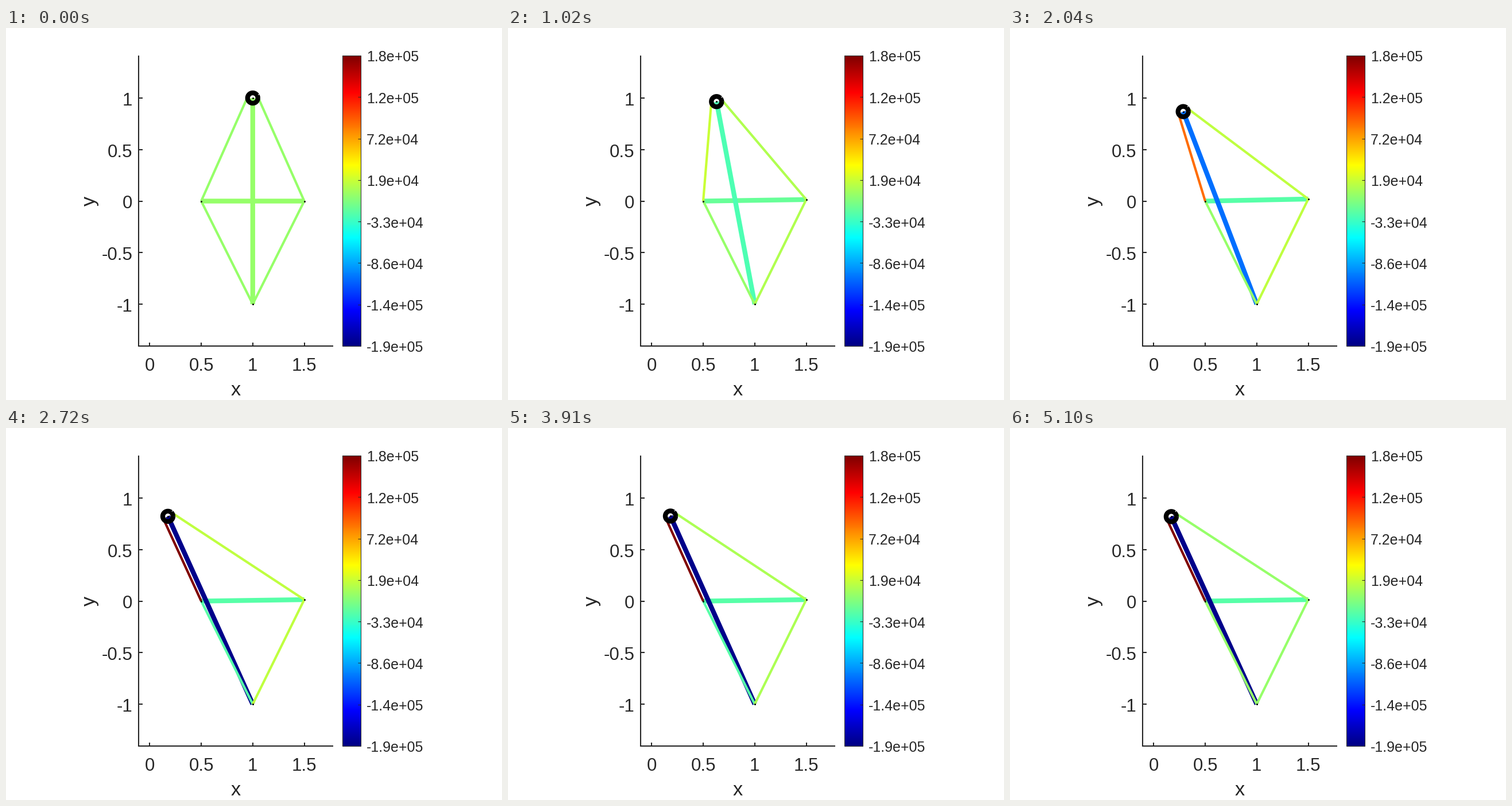
These frames come from a looping animation (864 px wide and 648 px high, 5.27 s). A matplotlib script:

```python
import numpy as np
import matplotlib.pyplot as plt
from matplotlib.animation import FuncAnimation
from matplotlib.colors import ListedColormap
from matplotlib.patches import Rectangle

W, H, DPI = 864, 648, 100
PX = 72 / DPI              # points per stage pixel
PT = 150 / 72              # plot line weights and fonts are set at 150 dpi
FRAMES, STEP = 31, 170
X0, Y0, UNIT = 250.3, 301.5, 179.5
INK = "#262626"
RING_R = 0.05 * UNIT
ZERO = 0.522               # unloaded level on the colour bar

plt.rcParams["font.family"] = "Liberation Sans"
fig = plt.figure(figsize=(W / DPI, H / DPI), dpi=DPI, facecolor="white")
ax = fig.add_axes([0, 0, 1, 1])
ax.axis("off")


def jet(v):
    bands = [1.5 - np.abs(4 * np.asarray(v) - c) for c in (3, 2, 1)]
    return np.clip(np.stack(bands, axis=-1), 0, 1)


def to_px(x, y):
    return np.array([X0 + UNIT * x, Y0 - UNIT * y])


def line(xs, ys, weight, color=INK, z=2, **kw):
    return ax.plot(xs, ys, lw=weight * PT * PX, color=color, zorder=z,
                   solid_capstyle="butt", **kw)[0]


def label(x, y, s, size, ha="center", **kw):
    ax.text(x, y, s, fontsize=size * PT * PX, color=INK, ha=ha,
            va="baseline", **kw)


def ease(t, start, end):
    u = np.clip((t - start) / (end - start), 0, 1)
    return u * u * (3 - 2 * u)


def polar(center, r, a):
    return center[0] + r * np.cos(a), center[1] + r * np.sin(a)


def tangent_angle(center, anchor, side):
    """Angle at which a string from anchor touches the ring."""
    d = anchor - center
    return np.arctan2(d[1], d[0]) + side * np.arccos(RING_R / np.hypot(*d))


# Axes
line([231, 231], [48, 555], 1)
line([230, 570], [554, 554], 1)
for v in np.arange(0, 2, 0.5):
    x = to_px(v, 0)[0]
    line([x, x], [554, 548], 1)
    label(x, 597, f"{v:g}", 15)
for v in np.arange(-1, 1.5, 0.5):
    y = to_px(0, v)[1]
    line([231, 238], [y, y], 1)
    label(220, y + 13, f"{v:g}", 15, ha="right")
label(400, 640, "x", 16.5)
label(154.5, 301, "y", 16.5, rotation=90, rotation_mode="anchor")

# Colour bar
ax.imshow(np.arange(256)[::-1, None], aspect="auto", zorder=1,
          cmap=ListedColormap(jet(np.arange(1, 257) / 256)),
          extent=(586, 618, 554, 48), interpolation="nearest")
ax.add_patch(Rectangle((586, 48), 32, 506, fill=False, ec=INK,
                       lw=PX, zorder=3))
for k, y in enumerate(np.linspace(554, 48, 8)):
    line([613, 618], [y, y], 0.5, z=3)
    label(628, y + 10.5, f"{-1.906e5 + 5.25e4 * k:.1e}", 12, ha="left")

ax.set_xlim(0, W)
ax.set_ylim(H, 0)

# Members, from back to front
MEMBERS = {"beam": 4, "mast": 4, "upper_left": 2, "upper_right": 2,
           "lower_left": 2, "lower_right": 2}
bars = {name: line([], [], weight, z=5 + i, snap=False)
        for i, (name, weight) in enumerate(MEMBERS.items())}
ring = line([], [], 4, "black", 20, snap=False)
notch = line([], [], 0.6, "white", 21, snap=False)
dots = ax.plot([], [], "o", ms=3 * PX, color="black", mew=0, zorder=22)[0]

LEFT, BOTTOM = to_px(0.5, 0), to_px(1, -1)
TURN = np.linspace(0, 2 * np.pi, 90)
SWING = 17.2               # frames until the mast meets its stop


def mast_x(t):
    """Fall towards the stop, then a slight rebound."""
    fall = np.sin(np.pi / 2 * min(t / SWING, 1) ** 1.16)
    rebound = 1 - np.cos(2 * np.pi * max(t - SWING, 0) / 12)
    return 1 - 0.83 * fall + 0.006 * rebound


def loads(t):
    u = min(t / 16, 1)
    pull = 0.041 * np.sin(np.pi * min(t / 28, 1))
    slack = ease(t, 12, 16) - ease(t, 23, 30)
    change = {
        "beam": -0.062 * ease(t, 0, 9),
        "mast": -0.512 * u ** 2,
        "upper_left": 0.478 * u ** 2.3,
        "upper_right": pull,
        "lower_left": -0.062 * slack,
        "lower_right": pull,
    }
    return {name: ZERO + d for name, d in change.items()}


def draw(i):
    x = mast_x(i)
    top = to_px(x, np.sqrt(4 - (1 - x) ** 2) - 1)
    right = to_px(1.5, 0.02 * ease(i, 2, 8) - 0.006 * ease(i, 12, 16))
    a_left = tangent_angle(top, LEFT, 1)
    a_right = tangent_angle(top, right, -1)

    ends = {
        "beam": (LEFT, right),
        "mast": (top, BOTTOM),
        "upper_left": (LEFT, polar(top, RING_R, a_left)),
        "upper_right": (polar(top, RING_R, a_right), right),
        "lower_left": (LEFT, BOTTOM),
        "lower_right": (right, BOTTOM),
    }
    level = loads(i)
    for name, pair in ends.items():
        bars[name].set_data(*np.transpose(pair))
        bars[name].set_color(jet(level[name]))

    ring.set_data(*polar(top, RING_R, TURN))
    notch.set_data(*polar(top, np.array([11, 13.4]),
                          0.6 * a_right - np.radians(16)))
    dots.set_data(*np.transpose([top, LEFT, right, BOTTOM]))
    return [*bars.values(), ring, notch, dots]


anim = FuncAnimation(fig, draw, frames=FRAMES, interval=STEP,
                     repeat=True, repeat_delay=0, blit=False)
plt.show()
```
